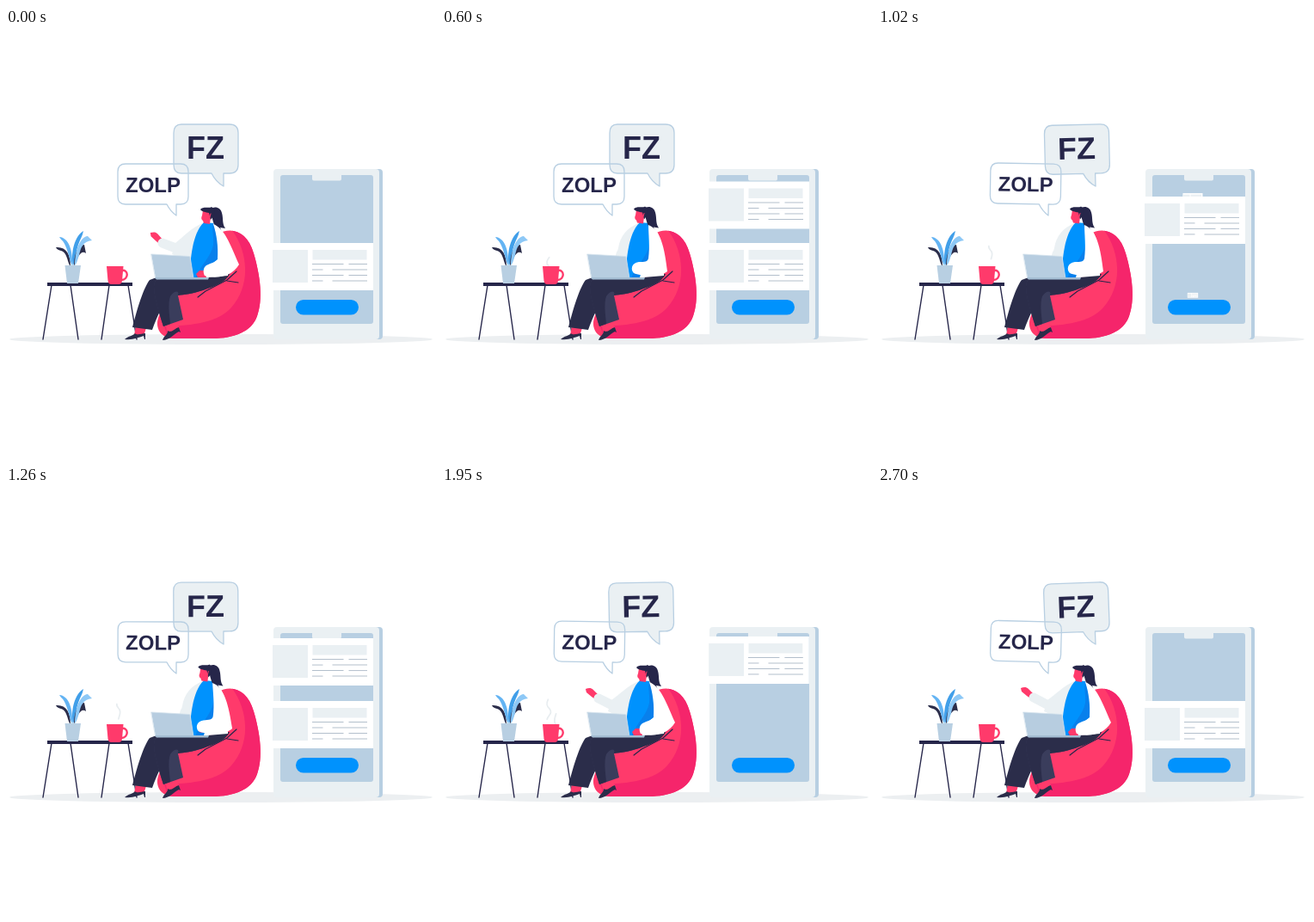
An HTML page with a canvas for the animation above (2730 ms loop, 500x500 px).

```html
<!DOCTYPE html>
<html lang="en">
<head>
<meta charset="utf-8">
<title>Working from a beanbag</title>
<style>
  html, body { margin: 0; width: 100%; height: 100%; overflow: hidden; background: #fff; }
  canvas { display: block; width: 500px; height: 500px; }
</style>
</head>
<body>
<canvas id="stage"></canvas>
<script>
const LOOP = 2730;
const INK = '#26264a', NAVY = '#2b2d4a', SLATE = '#3a3d5c', PINK = '#ff3a6b', ROSE = '#f5256b';
const PALE = '#eaf0f3', STEEL = '#b8cfe2', BLUE = '#0092fd', WHITE = '#fff';

const canvas = document.getElementById('stage');
const ctx = canvas.getContext('2d');
const ratio = window.devicePixelRatio || 1;
canvas.width = canvas.height = 500 * ratio;

const mix = (a, b, k) => a + (b - a) * k;
const smooth = k => k * k * (3 - 2 * k);
const linear = k => k;

// Interpolates rows of [time, ...values].
function key(t, rows, ease = linear) {
  if (t <= rows[0][0]) return rows[0].slice(1);
  for (let i = 1; i < rows.length; i++) {
    const [from, to] = [rows[i - 1], rows[i]];
    if (t < to[0]) {
      const k = ease((t - from[0]) / (to[0] - from[0]));
      return to.slice(1).map((v, j) => mix(from[j + 1], v, k));
    }
  }
  return rows[rows.length - 1].slice(1);
}

function fill(color, d) {
  ctx.fillStyle = color;
  ctx.fill(new Path2D(d));
}

function line(color, width, d) {
  ctx.strokeStyle = color;
  ctx.lineWidth = width;
  ctx.lineCap = ctx.lineJoin = 'round';
  ctx.stroke(new Path2D(d));
}

function box(color, x, y, w, h, r = 0) {
  ctx.fillStyle = color;
  ctx.beginPath();
  ctx.roundRect(x, y, w, h, r);
  ctx.fill();
}

function placed(x, y, angle, draw, scale = 1) {
  ctx.save();
  ctx.translate(x, y);
  ctx.rotate(angle * Math.PI / 180);
  ctx.scale(scale, scale);
  draw();
  ctx.restore();
}

function ground() {
  ctx.fillStyle = '#eceff1';
  ctx.beginPath();
  ctx.ellipse(250, 362, 246, 6, 0, 0, Math.PI * 2);
  ctx.fill();
}

function cardFace() {
  box(WHITE, -58.5, -27.5, 117, 55);
  box(PALE, -58.5, -19.5, 41, 38);
  box(PALE, -12, -19.5, 63, 11.5);
  for (let row = 0; row < 4; row++) {
    const y = -3.5 + row * 6.5;
    const [end, start] = row % 2 ? [0, 11] : [24, 30];
    box('#b3bfcc', -12.5, y, end + 12.5, 1);
    box('#b3bfcc', start, y, 51.5 - start, 1);
  }
}

// Centre x, centre y and scale over one card's life.
const CARD_LIFE = [
  [-206, 366, 315, 0], [-180, 366, 311, .1], [-20, 368.5, 277.5, 1], [290, 368.5, 277.5, 1],
  [330, 368.5, 267.5, 1], [420, 368.5, 223.5, 1], [600, 368.5, 206, 1], [750, 368.5, 202.5, 1],
  [930, 366, 198.5, .376], [1020, 366, 197.5, .2], [1050, 365.5, 196.5, .1], [1080, 365.5, 196.5, 0]
];
const CARD_STARTS = [0, 600, 1200, 2450];

function phone(t) {
  box(STEEL, 320, 164, 118, 198, 4);
  box(PALE, 311, 164, 123, 198, 4);
  box(STEEL, 319, 171, 108, 173, 3);
  box(PALE, 356, 168, 34, 9.5, 2);
  for (const start of CARD_STARTS) {
    const [x, y, scale] = key(t - start, CARD_LIFE);
    if (scale > 0) placed(x, y, 0, cardFace, scale);
  }
  box(BLUE, 337, 316, 73, 17.5, 8.75);
}

function label(text, size, x, y) {
  ctx.fillStyle = INK;
  ctx.font = `bold ${size}px "Liberation Sans", Arial, sans-serif`;
  ctx.textAlign = 'center';
  ctx.fillText(text, x, y);
}

function bubbles(t) {
  const sway = (1 - Math.cos(t / 600 * Math.PI * 2)) / 2;
  placed(253, 184, -2.2 * sway, () => {
    const d = 'M-49 -72H7Q17 -72 17 -62V-25Q17 -15 7 -15H0V0Q-9 -5 -14 -15H-49Q-58 -15 -58 -25V-62Q-58 -72 -49 -72Z';
    fill(PALE, d);
    line(STEEL, 1.3, d);
    label('FZ', 36, -21, -32);
  });
  placed(198, 218, 1.5 * sway, () => {
    line(STEEL, 1.3, 'M-59 -60H5Q14 -60 14 -51V-22Q14 -13 5 -13H0V0Q-7 -5 -11 -13H-59Q-68 -13 -68 -22V-51Q-68 -60 -59 -60Z');
    label('ZOLP', 24, -27, -27.5);
  });
}

function beanbag() {
  const bag = 'M246 240C262 230 281 237 288 262C296 289 299 316 292 335C286 353 265 361 240 361H195C181 361 173 350 177 337C182 322 200 306 211 298C226 285 240 260 246 240Z';
  fill(PINK, bag);
  ctx.save();
  ctx.clip(new Path2D(bag));
  fill(ROSE, 'M262 234C283 262 284 300 262 325C247 342 218 346 184 347L190 365H305V234Z');
  ctx.restore();
  line(INK, 1.2, 'M268 283L257 293L232 306L223 313M257 294L270 296');
}

function table() {
  line(INK, 1.4, 'M53 299L43 362M75 299L84 362M120 299L111 362M142 299L152 362');
  box(INK, 48, 296, 99, 4);
}

function plant() {
  const stalks = [
    [NAVY, 'M75 277C75 263 70 254 58 255C60 260 66 257 69 263C72 268 72 274 75 277Z'],
    ['#64b4f3', 'M77 277C78 261 74 244 62 243C65 248 66 246 69 253C73 262 74 270 77 277Z'],
    ['#419fe9', 'M78 277C75 260 80 242 90 236C89 242 86 246 84 252C81 260 81 269 78 277Z'],
    [NAVY, 'M79 277C79 264 83 252 91 252L93 262C87 257 83 267 79 277Z'],
    ['#8dc8f6', 'M80 276C80 259 86 243 95 242L100 247C89 248 87 256 85 264C83 271 82 274 80 276Z']
  ];
  stalks.forEach(([color, d]) => fill(color, d));
  fill(STEEL, 'M68.5 276H87L84 297H71Z');
}

function wisp(d, length, [from, to]) {
  if (to - from < .01) return;
  ctx.setLineDash([(to - from) * length, 200]);
  ctx.lineDashOffset = -from * length;
  line('#e8edf0', 1.8, d);
  ctx.setLineDash([]);
}

function mug(t) {
  wisp('M124 277C117 269 131 266 125 259C120 255 122 251 124 247', 32, key(t, [
    [450, 0, 0], [600, 0, .35], [800, .4, 1], [950, 1, 1], [1600, 1, 1], [1601, 0, 0],
    [1950, .2, 1], [2250, .05, .85], [2500, .85, .85]
  ]));
  wisp('M132 277C128 270 135 266 132 260C130 257 128 256 129 253', 25, key(t, [
    [750, 0, 0], [1020, .35, 1], [1530, .15, 1], [1720, 1, 1], [1721, 0, 0],
    [1950, 0, .5], [2250, .3, .9], [2450, .9, .9]
  ]));
  line(PINK, 2.4, 'M134 282C143 280 143 293 134 293');
  fill(PINK, 'M117 277H136.5L135 294Q134.500 298 131 298H122.5Q119 298 118.500 294Z');
}

// Elbow, wrist and hand angle of the far arm.
const FAR_ARM = [
  [0, 198, 257, 182, 250, 4], [220, 198, 258, 171, 277, -62], [450, 206, 263, 204, 281, -75],
  [1250, 206, 263, 204, 281, -75], [1530, 199, 259, 170, 276, -62],
  [1800, 198, 256, 182, 247, 0], [2700, 198, 256, 181, 246, 0]
];

function farArm(t) {
  const [ex, ey, wx, wy, turn] = key(t, FAR_ARM, smooth);
  placed(wx - 2, wy, turn, () =>
    fill(PINK, 'M2 -4L-4 -10C-7 -13 -10 -12 -13 -11L-12 -7L-6 -2L1 3Z'));
  line(PALE, 11, `M${ex + 2} ${ey}L${wx} ${wy}`);
  fill(PALE, `M228 227C215 233 207 242 ${ex - 1} ${ey - 7}L${ex - 5} ${ey + 6}L206 268H220L231 240Z`);
}

function legs() {
  fill(PINK, 'M151 347L163 349L160 358L149 357Z');
  fill(PINK, 'M185 344L199 341L202 351L188 356Z');
  fill(NAVY, 'M138 362C142 358 148 358 150 355C153 358 157 355 162 355V362H161L160 358C153 360 148 363 138 362Z');
  fill(NAVY, 'M182 363C184 357 188 357 188 352C193 355 196 349 201 348L203 354L201 353C195 356 190 363 182 363Z');
  fill(NAVY, 'M175 290L220 292L194 309C182 320 176 335 170 351L147 348C153 325 160 302 167 293Z');
  fill(SLATE, 'M180 291C210 289 239 292 260 286C255 296 245 299 229 305C218 309 207 310 200 311L206 339L183 347C177 328 172 311 172 300Q172 292 180 291Z');
  fill(NAVY, 'M181 291C210 289 239 292 260 286C255 296 245 299 229 305C216 309 207 310 200 311C202 305 196 305 191 312C188 321 190 332 191 344L183 347C177 328 172 311 172 300Q172 292 181 291Z');
}

function torso() {
  fill(WHITE, 'M238 227C250 231 259 245 258 288L222 291Z');
  fill(BLUE, 'M230 226L241 227C246 240 248 257 246 269C238 275 231 282 230 290L213 291C215 268 216 240 230 226Z');
  fill('#0880ec', 'M241 228C246 240 248 257 246 269C237 275 231 281 230 290L220 291C225 277 239 266 241 252C242 243 239 235 241 228Z');
}

function head(lean) {
  placed(mix(-3, 0, lean), mix(-.5, 0, lean), 0, () => {
    fill(INK, 'M238 211C242 206 250 209 251 215C253 222 251 227 255 233L249 232L251 237C243 234 242 229 240 222Z');
    fill(PINK, 'M229 212H239L237 228L230 227L229 224Q226 222 228 218Z');
    fill(INK, 'M226 211C229 207 236 210 239 208L243 211C242 216 241 220 238 223L236 215C232 214 228 214 226 211Z');
    line(PINK, 1, 'M238 216L237 220');
  });
}

function laptop() {
  const lid = 'M169 263L214 265.500L218 291L174 291Z';
  fill('#b7cde0', lid);
  line('#d5e2ed', .8, lid);
  fill('#a4bdd3', 'M173 290H236L235 292.500H175Z');
}

function nearArm(lean) {
  const p = (x0, y0, x1, y1) => `${mix(x0, x1, lean)} ${mix(y0, y1, lean)}`;
  fill(PINK, `M${p(228, 280, 231, 282)}L${p(225, 282, 225, 282)}L${p(224, 284, 221, 286)}L${p(226, 286, 223, 290)}L${p(232, 286, 233, 290)}Z`);
  fill(WHITE, `M${p(240, 229, 241, 228)}`
    + `C${p(254, 234, 254, 233)} ${p(259, 256, 260, 250)} ${p(262, 283, 271, 275)}`
    + `C${p(254, 290, 263, 289)} ${p(232, 289, 245, 292)} ${p(223, 285, 231, 288)}`
    + `C${p(219, 281, 229, 284)} ${p(220, 273, 229, 279)} ${p(229, 272, 233, 276)}`
    + `C${p(236, 272, 239, 273)} ${p(239, 272, 245, 272)} ${p(240, 268, 246, 269)}`
    + `C${p(242, 254, 247, 254)} ${p(240, 240, 245, 240)} ${p(240, 229, 241, 228)}Z`);
}

function render(t) {
  ctx.setTransform(ratio, 0, 0, ratio, 0, 0);
  ctx.fillStyle = WHITE;
  ctx.fillRect(0, 0, 500, 500);
  const [lean] = key(t, [[0, 1], [400, 0], [1200, 0], [1480, 1]], smooth);
  ground();
  phone(t);
  bubbles(t);
  beanbag();
  table();
  plant();
  mug(t);
  farArm(t);
  legs();
  torso();
  head(lean);
  laptop();
  nearArm(lean);
}

function tick() {
  render(performance.now() % LOOP);
  requestAnimationFrame(tick);
}
tick();
</script>
</body>
</html>
```
